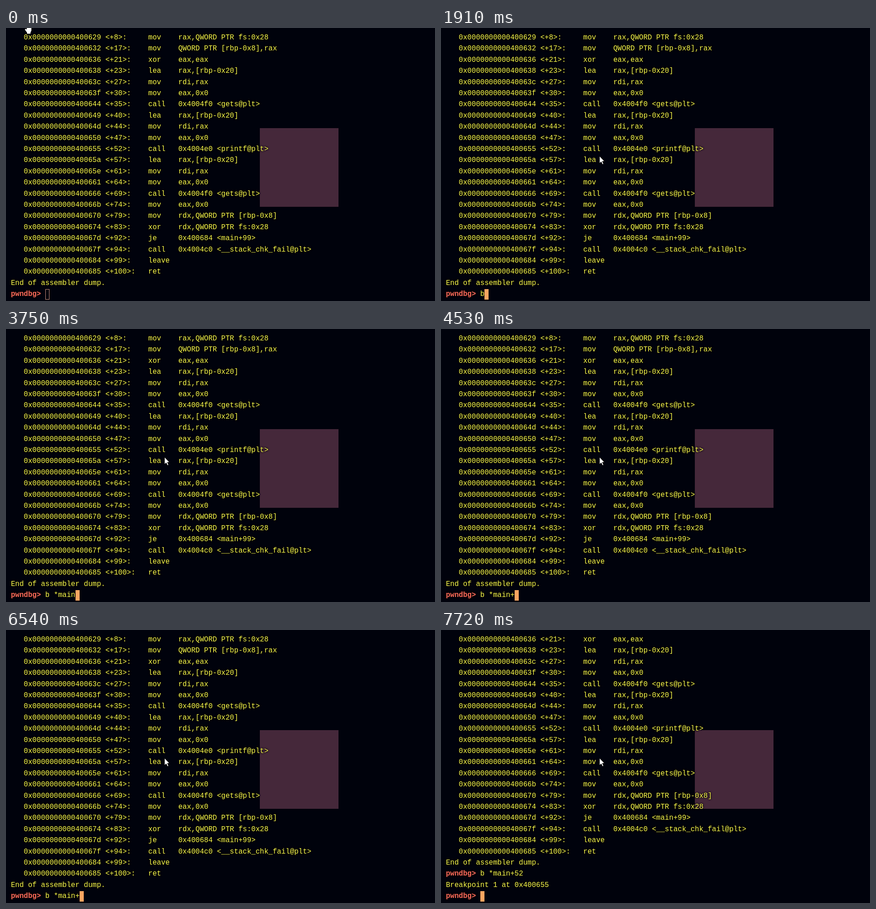
An HTML page for the animation above (8 s loop, 938x597 px).

```html
<!DOCTYPE html>
<html lang="en">
<head>
<meta charset="utf-8">
<title>Debugger session</title>
<style>
html, body { margin: 0; width: 100%; height: 100%; overflow: hidden; background: #00020c; }
#stage { position: relative; width: 938px; height: 597px; overflow: hidden; }
#mark { position: absolute; left: 555px; top: 219px; width: 172px; height: 172px; background: #45283a; }
pre {
  position: absolute; left: 10.7px; top: 8.9px; margin: 0;
  font: 15.65px/24.41px "Liberation Mono", "Noto Sans Mono", monospace;
  font-variant-ligatures: none; color: #fbfb4c;
  text-shadow: 0 0 3px #000, 0 0 4px #000;
}
pre b { color: #ff6c5c; font-weight: 700; }
#caret { position: absolute; top: 571px; width: 9px; height: 23px; box-sizing: border-box; background: #ffa560; }
#caret.hollow { background: none; border: 1px solid #c98f7a; }
svg { position: absolute; left: 0; top: 0; }
</style>
</head>
<body>
<div id="stage">
  <div id="mark"></div>
  <pre id="text"></pre>
  <div id="caret"></div>
  <svg width="938" height="597" fill="#fff" stroke="#000" stroke-linejoin="round">
    <path id="hand" d="M45-3V2.5L43 1.5Q40.5 1.5 41 4L45.5 10V13H54V10L56 5.5V-3Z"/>
    <path id="arrow" d="M0 0V16L3.7 12.6L6.4 18.4L9 17.2L6.4 11.6H11.2Z"/>
  </svg>
</div>
<script>
const LOOP = 8000, CELL = 9.39, LEFT = 10.9, ROWS = 24;
const $ = id => document.getElementById(id);

// address tail, offset, opcode, operands
const code = `629 8 mov rax,QWORD PTR fs:0x28
632 17 mov QWORD PTR [rbp-0x8],rax
636 21 xor eax,eax
638 23 lea rax,[rbp-0x20]
63c 27 mov rdi,rax
63f 30 mov eax,0x0
644 35 call 0x4004f0 <gets@plt>
649 40 lea rax,[rbp-0x20]
64d 44 mov rdi,rax
650 47 mov eax,0x0
655 52 call 0x4004e0 <printf@plt>
65a 57 lea rax,[rbp-0x20]
65e 61 mov rdi,rax
661 64 mov eax,0x0
666 69 call 0x4004f0 <gets@plt>
66b 74 mov eax,0x0
670 79 mov rdx,QWORD PTR [rbp-0x8]
674 83 xor rdx,QWORD PTR fs:0x28
67d 92 je 0x400684 <main+99>
67f 94 call 0x4004c0 <__stack_chk_fail@plt>
684 99 leave
685 100 ret`.split("\n").map(row => {
  const [addr, off, op, ...args] = row.split(" ");
  return `   0x0000000000400${addr} <+${off}>:`.padEnd(32) + op.padEnd(7) + args.join(" ");
});
code.push("End of assembler dump.");

const PROMPT = "pwndbg> ", COMMAND = "b *main+52";

// [time, typed characters, caret]
const steps = [
  [0, 0, "hollow"], [1010, 0, "on"], [1910, 1, "on"], [2450, 1, "off"],
  [2690, 2, "on"], [3070, 3, "on"], [3330, 4, "on"], [3490, 5, "on"],
  [3610, 6, "on"], [3750, 7, "on"], [4530, 8, "on"], [4920, 8, "off"],
  [5460, 8, "on"], [6000, 8, "off"], [6540, 8, "on"], [7060, 9, "on"],
  [7200, 10, "on"], [7720, 0, "on"]
];
// [time, x, y] of the arrow; the hand shows before the first one
const moves = [[120, 198, 142], [240, 346.5, 280]];
const ENTER = 7720;

const last = (table, t) => table.filter(row => row[0] <= t).pop();
const escape = s => s.replace(/&/g, "&amp;").replace(/</g, "&lt;").replace(/>/g, "&gt;");
const prompt = typed => `<b>${escape(PROMPT)}</b>${typed}`;

let shown;
function draw(t) {
  const step = last(steps, t), [, count, caret] = step;
  if (step !== shown) {
    shown = step;
    const lines = code.map(escape);
    if (t >= ENTER) lines.push(prompt(COMMAND), "Breakpoint 1 at 0x400655");
    lines.push(prompt(COMMAND.slice(0, count)));
    $("text").innerHTML = lines.slice(-ROWS).join("\n");
    $("caret").className = caret;
    $("caret").style.visibility = caret === "off" ? "hidden" : "visible";
    $("caret").style.left = Math.round(LEFT + (PROMPT.length + count) * CELL) + "px";
  }
  const spot = last(moves, t);
  $("hand").style.display = spot ? "none" : "";
  $("arrow").style.display = spot ? "" : "none";
  if (spot) $("arrow").setAttribute("transform", `translate(${spot[1]} ${spot[2]})`);
}

const start = performance.now();
function tick() {
  draw((performance.now() - start) % LOOP);
  requestAnimationFrame(tick);
}
draw(0);
tick();
</script>
</body>
</html>
```
